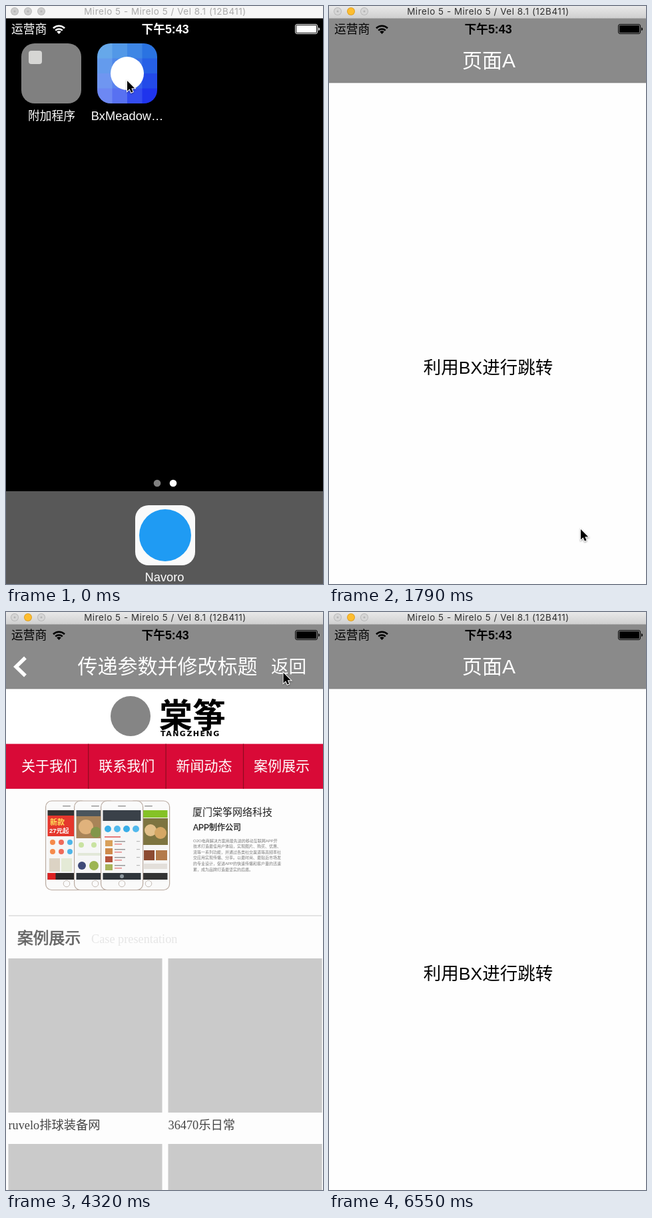
These frames come from a looping animation (476 px wide and 866 px high, 7090 ms). An HTML page:

```html
<!DOCTYPE html>
<html lang="zh-CN">
<head>
<meta charset="utf-8">
<title>Page transition demo</title>
<style>
html, body { margin: 0; width: 100%; height: 100%; overflow: hidden; background: #000; }
svg { display: block; width: 476px; height: 866px; }
text { font-family: "Liberation Sans", "Noto Sans CJK SC", "Noto Sans CJK", sans-serif; white-space: pre; }
.mid { text-anchor: middle; }
.bar { font: 13.4px Inter, "Open Sans", sans-serif; letter-spacing: .55px; }
.label { font-size: 18.3px; fill: #fff; }
.nav { fill: #fff; font-weight: 300; font-size: 30px; }
.menu { fill: #fff; font-size: 21px; font-weight: 300; }
.serif { font-family: "Liberation Serif", "Noto Sans CJK SC", "Noto Sans CJK", serif; font-size: 18.3px; fill: #444; }
.brand { font-weight: 900; }
.latin { font-family: "DejaVu Sans", sans-serif; font-weight: bold; }
.tiny { font-size: 6px; fill: #777; }
#cursor { stroke: #fff; stroke-width: 2; paint-order: stroke; filter: drop-shadow(0 1px 1px rgba(0, 0, 0, .4)); }
</style>
</head>
<body>
<svg viewBox="0 0 476 866">
  <defs>
    <linearGradient id="chrome" x2="0" y2="1"><stop stop-color="#e9e9e9"/><stop offset="1" stop-color="#cfcfcf"/></linearGradient>
    <linearGradient id="shade"><stop stop-color="#000" stop-opacity=".02"/><stop offset="1" stop-color="#000" stop-opacity=".18"/></linearGradient>
    <linearGradient id="swoosh"><stop offset=".4" stop-color="#2b95e9"/><stop offset="1" stop-color="#2b95e9" stop-opacity="0"/></linearGradient>
    <clipPath id="tile"><rect x="137" y="56" width="90" height="90" rx="20"/></clipPath>
    <g id="status" fill="currentColor">
      <text x="8" y="41" font-size="17.8">运营商</text>
      <path d="M71 33.2a12.2 12.2 0 0 1 17 0M74.2 36.6a7.8 7.8 0 0 1 10.6 0" fill="none" stroke="currentColor" stroke-width="2.6"/>
      <path d="M76.2 38.6a4.6 4.6 0 0 1 6.6 0L79.5 42Z"/>
      <text class="mid" x="239" y="41" font-size="17.8" font-weight="bold">下午5:43</text>
      <rect x="434.5" y="27.5" width="33" height="14" rx="2.5" fill="none" stroke="currentColor"/>
      <rect x="436" y="29" width="30" height="11" rx="1"/>
      <path d="M469 32q2 .5 2 2.5t-2 2.5z"/>
    </g>
  </defs>
  <rect width="476" height="866"/>

  <g id="home">
    <g color="#fff"><use href="#status"/></g>
    <rect x="23" y="56" width="90" height="90" rx="20" fill="#808080"/>
    <rect x="34" y="67" width="20" height="20" rx="4" fill="#d6d6d4"/>
    <text class="label mid" x="68.5" y="170.5" style="font-size:17.8px">附加程序</text>
    <g id="mosaic" clip-path="url(#tile)"></g>
    <circle cx="182" cy="101" r="25" fill="#fff"/>
    <rect id="press" x="137" y="56" width="90" height="90" rx="20" opacity=".45"/>
    <text class="label mid" x="182" y="170.5">BxMeadow…</text>
    <circle cx="227" cy="715" r="5.3" fill="#808080"/>
    <circle cx="251" cy="715" r="5.3" fill="#fff"/>
    <rect y="727" width="476" height="139" fill="#585858"/>
    <rect x="194" y="748" width="90" height="90" rx="20" fill="#fafafa"/>
    <circle cx="239" cy="793" r="39" fill="#1f9bf3"/>
    <text class="label mid" x="238" y="862">Navoro</text>
  </g>

  <g id="app">
    <g id="splash">
      <rect y="19" width="476" height="847" fill="#fefefe"/>
      <g transform="matrix(1.0215 0 0 1.0418 -4.09 -1.84)" fill="#2b95e9">
        <circle cx="157" cy="245" r="36"/>
        <text class="brand" x="216" y="267" font-size="63.5">棠筝</text>
        <text class="latin" x="218" y="285" font-size="13.5" letter-spacing="2">TANGZHENG</text>
        <text x="121" y="341" font-size="25" stroke="#2b95e9" stroke-width=".6">一站式APP外包服务</text>
        <path fill="url(#swoosh)" d="M124 373Q215 346 336 355Q225 351 126 375Z"/>
        <text class="mid" x="236.5" y="805" font-size="17.3" stroke="#2b95e9" stroke-width=".3">ilivingthebestlife.com</text>
      </g>
    </g>
    <g id="pages">
      <g id="pageA">
        <rect y="115" width="476" height="751" fill="#fefefe"/>
        <text class="mid" x="239" y="550.5" font-size="26.5" font-weight="300">利用BX进行跳转</text>
      </g>
      <rect id="dim" y="115" width="476" height="751"/>
      <g id="pageB">
        <rect x="-8" y="115" width="8" height="751" fill="url(#shade)"/>
        <rect y="115" width="476" height="751" fill="#fdfdfd"/>
        <g id="web">
          <g id="logo">
            <rect y="115" width="476" height="82" fill="#fff"/>
            <circle cx="187" cy="156" r="30" fill="#858585"/>
            <text class="brand" x="230" y="173" font-size="50">棠筝</text>
            <text class="latin" x="232" y="186" font-size="11" letter-spacing="1.5">TANGZHENG</text>
          </g>
          <g id="menu"><rect y="115.3" width="476" height="67.3" fill="#d90a37"/></g>
          <g id="banner">
            <g id="phones"></g>
            <text x="280" y="304.5" font-size="15" fill="#222">厦门棠筝网络科技</text>
            <text x="281" y="326.5" font-size="12" fill="#222" stroke="#222" stroke-width=".3">APP制作公司</text>
            <g id="para" class="tiny"></g>
          </g>
          <g id="cases">
            <path d="M4 236H474" stroke="#ddd" stroke-width="1.5"/>
            <text x="17" y="277.5" font-size="23.8" fill="#666" stroke="#666" stroke-width=".7">案例展示</text>
            <text class="serif" x="128" y="277" style="fill:#e6e6e6">Case presentation</text>
          </g>
        </g>
      </g>
      <rect y="18" width="476" height="97" fill="#8a8a8a"/>
      <path d="M0 115H476" stroke="#7c7c7c" stroke-width=".6"/>
      <text id="titleA" class="nav mid" x="240" y="92">页面A</text>
      <text id="titleB" class="nav mid" x="242.5" y="92">传递参数并修改标题</text>
      <path id="back" d="M29 68.5L15 82L29 95.5" fill="none" stroke="#fff" stroke-width="5.5"/>
      <text id="action" class="nav" x="398" y="91" style="font-size:26.5px">返回</text>
    </g>
    <use href="#status"/>
  </g>

  <rect id="chromeBar" width="476" height="18.5"/>
  <g id="lights"></g>
  <text id="barText" class="bar mid" x="239" y="13">Mirelo 5 - Mirelo 5 / Vel 8.1 (12B411)</text>
  <path id="cursor" d="M0 0V15.5L3.6 12.2 6 17.6 8.6 16.5 6.3 11.2H11.2Z"/>
</svg>
<script>
const LOOP = 7090, TICK = 148.5;
const el = {};
document.querySelectorAll('[id]').forEach(e => el[e.id] = e);
const add = (id, markup) => el[id].insertAdjacentHTML('beforeend', markup);
const rect = (x, y, w, h, fill, r = 0) =>
  `<rect x="${x}" y="${y}" width="${w}" height="${h}" rx="${r}" fill="${fill}"/>`;
const dot = (x, y, r, fill) => `<circle cx="${x}" cy="${y}" r="${r}" fill="${fill}"/>`;

// Icon tile background
for (let i = 0; i < 16; i++) {
  const c = i % 4, r = i >> 2;
  add('mosaic', rect(137 + c * 22.5, 56 + r * 22.5, 23, 23,
    `hsl(${210 + r * 6 + c * 2},${76 + r * 3}%,${66 - c * 4.5 + (r > 1 && c < 2 ? 3 : 0)}%)`));
}

['关于我们', '联系我们', '新闻动态', '案例展示'].forEach((label, i) => {
  add('menu', `<text class="menu" x="${23 + i * 116.3}" y="156">${label}</text>`);
  if (i) add('menu', rect(6.7 + i * 116.4, 115.3, 1.2, 67.3, '#8f0c20'));
});

['ruvelo排球装备网', '36470乐日常', 'DVD小库', '萝卜蹦蹦'].forEach((label, i) => {
  const x = i % 2 ? 243.5 : 3.5, y = 300 + (i >> 1) * 278;
  add('cases', rect(x, y, 231, 231, '#cacaca') +
    `<text class="serif" x="${x}" y="${y + 255.5}">${label}</text>`);
});

[
  'O2O电商解决方案用最先进的移动互联网APP开',
  '技术打造最佳用户体验，实现图片、购买、优惠、',
  '流等一系列功能，并通过各类社交渠道等高频率社',
  '交应用实现传播、分享。以最时尚、最贴近市场发',
  '的专业设计，促进APP的快速传播和客户量的迅速',
  '累，成为品牌打造最坚实的后盾。'
].forEach((line, i) => add('para', `<text x="281" y="${344.5 + i * 8.6}">${line}</text>`));

// Phones, back to front; each screen is drawn from its left edge
const body = x =>
  `<rect x="${x + 0.6}" y="283" width="63" height="133.5" rx="9" fill="#fafafa" stroke="#b9aaa0" stroke-width="1.2"/>` +
  rect(x + 26, 290, 12, 1.6, '#999', 0.8) +
  `<circle cx="${x + 32}" cy="407" r="4.8" fill="none" stroke="#c4bbb4"/>` +
  rect(x + 3.5, 297, 57, 104, '#f6f6f6');
const grid = (x, y, cols, rows, dx, dy, r, colors) => {
  let out = '';
  for (let i = 0; i < cols * rows; i++)
    out += dot(x + i % cols * dx, y + Math.floor(i / cols) * dy, r, colors[i % colors.length]);
  return out;
};
const screens = [
  [59, x => rect(x + 3.5, 297, 57, 8, '#333') + rect(x + 3.5, 305, 57, 31, '#e5372d') +
    `<text x="${x + 7}" y="319" font-size="11" font-weight="bold" fill="#ffe45c">新款</text>` +
    `<text x="${x + 6}" y="331" font-size="9.5" font-weight="bold" fill="#fff">27元起</text>` +
    grid(x + 11, 345, 3, 2, 13, 14, 4, ['#f58a4b', '#ef6a5a', '#4fb5e8']) +
    rect(x + 6, 369, 16, 20, '#dcd3c4') + rect(x + 24, 369, 16, 20, '#e4ead6') +
    rect(x + 3.5, 391, 57, 10, '#2b2b2b') + rect(x + 3.5, 391, 12, 10, '#d22')],
  [182, x => rect(x + 3.5, 297, 57, 11, '#85c226') + rect(x + 22, 309, 39, 40, '#7d7440') +
    dot(x + 35, 327, 9, '#e2c08a') + dot(x + 50, 331, 9, '#d5a764') +
    rect(x + 25, 357, 16, 15, '#8d4b32') + rect(x + 43, 357, 17, 15, '#b37a4a') +
    rect(x + 25, 377, 35, 8, '#e3dfda') + rect(x + 3.5, 391, 57, 10, '#333')],
  [102, x => rect(x + 3.5, 297, 57, 9, '#4b555c') + rect(x + 3.5, 306, 57, 33, '#a98458') +
    dot(x + 18, 322, 11, '#e0b27c') + dot(x + 33, 330, 8, '#82964a') +
    dot(x + 11, 349, 4, '#c9e3a1') + dot(x + 30, 349, 4, '#c9e3a1') +
    rect(x + 6, 361, 34, 4, '#e2e8d8') + dot(x + 12, 380, 6, '#3f4a78') + dot(x + 30, 380, 7, '#9db552') +
    rect(x + 3.5, 391, 57, 10, '#2f353b')],
  [142, x => rect(x + 3.5, 297, 57, 16, '#3a4149') +
    grid(x + 11, 325, 4, 1, 14, 0, 5, ['#39aee8', '#52b9ec']) +
    rect(x + 6, 336, 24, 2, '#e67b7b') +
    ['#d9a05a', '#cf8a4a', '#b5543c', '#a9b45a'].map((fill, i) => {
      const y = 342 + i * 12;
      return rect(x + 7, y, 11, 9, fill) + rect(x + 21, y + 1, 16, 1.5, '#999') +
        rect(x + 21, y + 5, 11, 1.5, '#e58a8a') + rect(x + 54, y + 1, 5, 1.2, '#bbb');
    }).join('') +
    rect(x + 3.5, 391, 57, 10, '#2f353b') + dot(x + 32, 396, 3, '#8a949c')]
];
screens.forEach(([x, draw]) => add('phones', body(x) + draw(x)));

// Pointer tip by tick; straight moves between the stops
const path = [[0, 182, 112], [6, 182, 112], [7, 210, 260], [8, 290, 520], [9, 355, 710], [10, 381, 784],
  [12, 378, 784], [13, 332, 712], [14, 266, 610], [15, 239, 552], [20, 239, 552], [21, 285, 480],
  [22, 345, 350], [23, 395, 230], [24, 412.5, 172], [26, 412.5, 172], [27, 414, 140], [28, 416, 104],
  [29, 416.5, 91], [37, 416.5, 91], [38, 418, 230], [39, 418, 560], [40, 418, 782], [41, 418, 782],
  [42, 404, 802], [43, 387, 838], [44, 380, 890]];
function pointer(n) {
  const i = path.findIndex(p => p[0] > n);
  if (i < 0) return path[path.length - 1].slice(1);
  const [n0, x0, y0] = path[i - 1], [n1, x1, y1] = path[i], k = (n - n0) / (n1 - n0);
  return [x0 + (x1 - x0) * k, y0 + (y1 - y0) * k];
}

// Critically damped slide, four ticks long
function slide(k) {
  if (k < 0) return 0;
  if (k > 3) return 1;
  const x = 0.63 + 1.7 * k;
  return 1 - (1 + x) * Math.exp(-x);
}

const show = (e, on) => e.setAttribute('visibility', on ? 'inherit' : 'hidden');
const move = (e, x, y = 0) => e.setAttribute('transform', `translate(${x} ${y})`);
const fade = (e, a) => e.setAttribute('opacity', a);

function launch(n) {
  const [x, y, w, h] = n < 5 ? [50, 35, 325, 520] : n < 6 ? [4, 20, 466, 813.5] : [0, 19, 476, 847];
  const sx = w / 476, sy = h / 847;
  el.app.setAttribute('transform', `matrix(${sx} 0 0 ${sy} ${x} ${y - 19 * sy})`);
  fade(el.app, n < 5 ? 0.85 : 1);
  show(el.app, n > 3);
  show(el.home, n < 5);
  show(el.press, n === 3);
  const zoom = n === 4 ? 1.8 : 1;
  el.home.setAttribute('transform', `translate(182 101) scale(${zoom}) translate(-182 -101)`);
  fade(el.home, n === 4 ? 0.35 : 1);
  show(el.splash, n < 10);
  show(el.pages, n > 9);
}

function navigate(n) {
  const q = slide(n - 19) - slide(n - 36);
  move(el.pageA, -143 * q);
  fade(el.dim, 0.1 * q);
  move(el.pageB, 476 * (1 - q));
  show(el.pageB, q > 0);
  move(el.titleA, -180 * q);
  fade(el.titleA, (1 - q) ** 2);
  move(el.titleB, 250 * (1 - q));
  fade(el.titleB, q ** 3);
  fade(el.action, q ** 3);
  fade(el.back, q ** 2);
}

function load(n) {
  show(el.web, n > 22 && n < 40);
  show(el.logo, n > 24);
  show(el.banner, n > 26);
  move(el.menu, 0, n > 24 ? 82.3 : 0);
  move(el.cases, 0, n > 25 ? 219 : n > 24 ? 82 : 0);
}

function chrome(active) {
  el.chromeBar.setAttribute('fill', active ? 'url(#chrome)' : '#f6f6f6');
  el.barText.setAttribute('fill', active ? '#2e2e2e' : '#a9a9a9');
  el.lights.innerHTML = [13, 33, 53].map((x, i) => {
    const lit = active && i === 1;
    return dot(x, 8, 6, lit ? '#dfa023' : '#b9b9b9') +
      dot(x, 8, 5, lit ? '#fdbd2f' : active ? '#d6d6d6' : '#cdcdcd') +
      (lit ? '' : dot(x, 8, 1.5, '#b4b4b4'));
  }).join('');
}

let last = -1;
const start = performance.now();
function frame() {
  const n = Math.floor((performance.now() - start) % LOOP / TICK);
  if (n !== last) {
    last = n;
    launch(n);
    navigate(n);
    load(n);
    chrome(n > 2);
    move(el.cursor, ...pointer(n));
  }
  requestAnimationFrame(frame);
}
frame();
</script>
</body>
</html>
```
